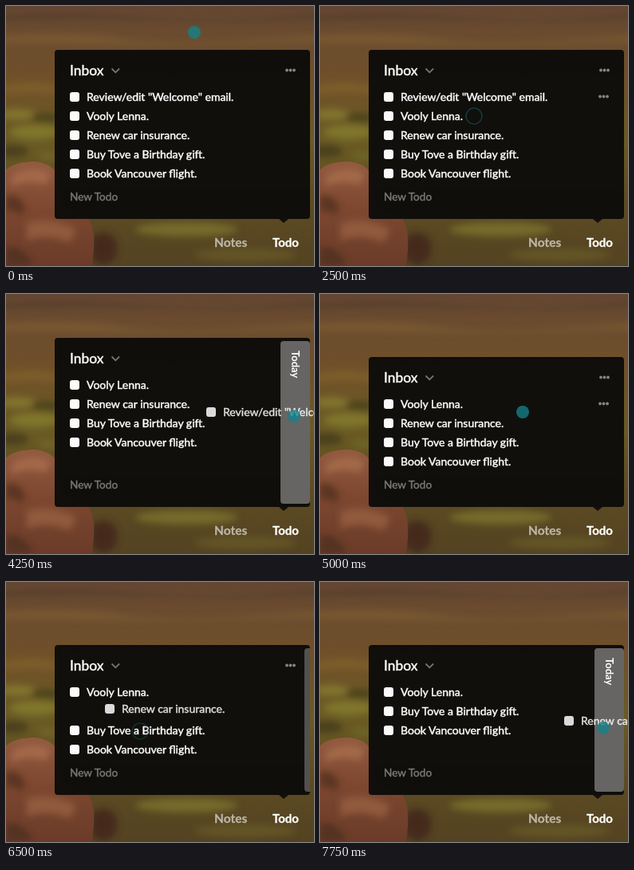
These frames come from a looping animation (386x326 px, 8 s). An HTML page:

```html
<!DOCTYPE html>
<html lang="en">
<head>
<meta charset="utf-8">
<title>Todo drag and drop</title>
<style>
  html, body { margin: 0; width: 100%; height: 100%; overflow: hidden; background: #5d4626; }
  svg { display: block; width: 386px; height: 326px; font-family: Lato, "Open Sans", sans-serif; }

  /* One beat is 250 ms, 3.125% of the loop; every pose holds until the next. */
  .anim { animation: 8s step-end infinite; }

  .row text { font-size: 14px; fill: #fff; stroke: #fff; stroke-width: .45px; }
  .row rect { fill: #fafafa; }
  .dots { fill: #858482; }

  #panel { animation-name: panel; }
  .head { animation-name: head; }
  #second { animation-name: second; }
  .lower { animation-name: lower; }
  #first { animation-name: first; }
  #third { animation-name: third; }
  #rowDots { animation-name: rowDots; }
  #strip { animation-name: strip; }
  #bar { animation-name: bar; }
  #pointer { animation-name: pointer; }
  #disc { animation-name: disc; }
  #ring { animation-name: ring; }

  @keyframes panel {
    0% { y: 55px; height: 212px; }
    62.5% { y: 79px; height: 188px; }
  }
  @keyframes head {
    0% { transform: none; }
    62.5% { transform: translateY(24px); }
  }
  @keyframes second {
    0%, 62.5% { transform: none; }
    40.625% { transform: translateY(-24px); }
  }
  @keyframes lower {
    0%, 62.5% { transform: none; }
    46.875%, 90.625% { transform: translateY(-24px); }
  }
  @keyframes first {
    0% { transform: none; opacity: 1; }
    34.375% { transform: translate(12px, 2px); opacity: .87; }
    37.5% { transform: translate(52px, 7px); }
    40.625% { transform: translate(110px, 14px); }
    43.75% { transform: translate(154px, 19px); }
    46.875% { transform: translate(154px, 22px); }
    50% { transform: translate(154px, 24px); }
    53.125% { transform: translate(171px, 34px); }
    59.375% { opacity: 0; }
  }
  @keyframes third {
    0%, 62.5% { transform: none; opacity: 1; }
    46.875% { transform: translateY(-24px); }
    81.25% { transform: translate(44px, -3px); opacity: .87; }
    84.375% { transform: translate(90px, 0); }
    87.5% { transform: translate(160px, 4px); }
    90.625% { transform: translate(205px, 8px); }
    93.75% { transform: translate(220px, 11px); }
    96.875% { transform: translate(226px, 12px); }
  }
  @keyframes rowDots {
    0%, 46.875%, 65.625%, 81.25% { transform: none; opacity: 0; }
    21.875% { transform: none; opacity: 1; }
    62.5% { transform: translateY(24px); opacity: 1; }
    78.125% { transform: translateY(48px); opacity: 1; }
  }
  @keyframes strip {
    0%, 62.5% { transform: translateX(40px); fill: #525150; }
    34.375% { transform: translateX(33px); }
    37.5%, 81.25% { transform: translateX(30px); fill: #525150; }
    46.875%, 90.625% { transform: translateX(14px); fill: #5b5a59; }
    50%, 93.75% { transform: none; fill: #666564; }
    59.375% { transform: translateX(25px); fill: #525150; }
  }
  @keyframes bar {
    0% { y: 59px; height: 204px; }
    62.5% { y: 83px; height: 180px; }
  }
  @keyframes pointer {
    0% { transform: translate(236px, 33px); }
    6.25% { transform: translate(222px, 42px); }
    9.375% { transform: translate(190px, 62px); }
    12.5% { transform: translate(157px, 83px); }
    15.625% { transform: translate(139px, 94px); }
    18.75% { transform: translate(135px, 96px); }
    21.875% { transform: translate(147px, 104px); }
    25% { transform: translate(175px, 114px); }
    28.125% { transform: translate(190px, 119px); }
    31.25% { transform: translate(193px, 138px); }
    34.375% { transform: translate(202px, 121px); }
    37.5% { transform: translate(242px, 126px); }
    40.625% { transform: translate(300px, 133px); }
    43.75% { transform: translate(343px, 138px); }
    46.875% { transform: translate(343px, 141px); }
    50% { transform: translate(343px, 143px); }
    53.125% { transform: translate(361px, 153px); }
    59.375% { transform: translate(325px, 150px); }
    62.5% { transform: translate(254px, 148px); }
    65.625% { transform: translate(160px, 116px); }
    68.75% { transform: translate(72px, 83px); }
    71.875% { transform: translate(24px, 64px); }
    75% { transform: translate(62px, 112px); }
    78.125% { transform: translate(129px, 171px); }
    81.25% { transform: translate(168px, 187px); }
    84.375% { transform: translate(219px, 171px); }
    87.5% { transform: translate(289px, 175px); }
    90.625% { transform: translate(334px, 179px); }
    93.75% { transform: translate(349px, 182px); }
    96.875% { transform: translate(355px, 183px); }
  }
  @keyframes disc {
    0%, 34.375%, 84.375% { opacity: .78; }
    31.25%, 81.25% { opacity: 0; }
  }
  @keyframes ring {
    0%, 34.375%, 84.375% { opacity: 0; }
    31.25% { opacity: .45; }
    81.25% { opacity: .35; }
  }
</style>
</head>
<body>
<svg viewBox="0 0 386 326">
  <defs>
    <linearGradient id="hill" x2="0" y2="1">
      <stop offset="0" stop-color="#644733"/>
      <stop offset=".1" stop-color="#6a4b2f"/>
      <stop offset=".25" stop-color="#6f4f2a"/>
      <stop offset=".38" stop-color="#6e5427"/>
      <stop offset=".52" stop-color="#6a5a24"/>
      <stop offset=".8" stop-color="#5b4a22"/>
      <stop offset="1" stop-color="#544222"/>
    </linearGradient>
    <linearGradient id="stone" x2="0" y2="1">
      <stop offset="0" stop-color="#925b40"/>
      <stop offset=".45" stop-color="#7d4730"/>
      <stop offset="1" stop-color="#6a3c28"/>
    </linearGradient>
    <filter id="soft" x="-30%" y="-30%" width="160%" height="160%"><feGaussianBlur stdDeviation="4"/></filter>
    <clipPath id="inside"><rect x="61" y="55" width="320" height="212" rx="4"/></clipPath>
    <g id="more"><circle cx="-4.5" r="1.9"/><circle r="1.9"/><circle cx="4.5" r="1.9"/></g>
  </defs>

  <rect width="386" height="326" fill="url(#hill)"/>
  <g filter="url(#soft)">
    <path d="M-10 12Q90 6 180 14T400 8V14Q280 22 190 18T-10 18Z" fill="#573d2b"/>
    <path d="M-10 38Q80 32 150 42T400 36V44Q240 50 140 48T-10 46Z" fill="#7a5931"/>
    <path d="M0 98Q30 92 70 100V112Q30 106 -10 112Z" fill="#7b5c29"/>
    <ellipse cx="14" cy="136" rx="22" ry="7" fill="#81752d"/>
    <ellipse cx="50" cy="140" rx="18" ry="6" fill="#4d451c"/>
    <ellipse cx="36" cy="158" rx="32" ry="9" fill="#807629"/>
    <ellipse cx="8" cy="182" rx="20" ry="8" fill="#4b401b"/>
    <ellipse cx="54" cy="188" rx="14" ry="6" fill="#6e6427"/>
    <ellipse cx="122" cy="304" rx="18" ry="20" fill="#452a1a"/>
    <ellipse cx="226" cy="280" rx="64" ry="9" fill="#766a2b"/>
    <ellipse cx="300" cy="312" rx="64" ry="8" fill="#635425"/>
  </g>
  <path d="M0 206Q8 196 34 195Q58 196 66 214L70 250Q88 262 104 268Q114 282 108 326H0Z" fill="url(#stone)"/>
  <g filter="url(#soft)">
    <path d="M8 212Q34 198 56 210L50 224Q28 216 6 226Z" fill="#a3694a"/>
    <path d="M0 238Q14 234 24 250L20 264Q10 254 0 258Z" fill="#5c3424"/>
    <path d="M26 272Q56 262 88 280L80 296Q50 284 26 294Z" fill="#905a3d"/>
    <path d="M0 302Q24 300 34 326H0Z" fill="#553021"/>
  </g>

  <g font-weight="700" stroke-width=".3">
    <text x="261" y="302" font-size="15.5" fill="#bdb5a7" stroke="#bdb5a7">Notes</text>
    <text x="334" y="302" font-size="15" fill="#fff" stroke="#fff">Todo</text>
  </g>

  <path d="M342 267h12l-6 5z" fill="#12110d"/>
  <rect id="panel" class="anim" x="61" y="55" width="320" height="212" rx="4" fill="#0e0d0b" fill-opacity=".97"/>
  <g class="head anim">
    <text x="80" y="87" font-size="17.5" fill="#fff" stroke="#fff" stroke-width=".4">Inbox</text>
    <path d="M132.5 78.5l4.800 4.800 4.800-4.800" fill="none" stroke="#777571" stroke-width="1.8"/>
    <use href="#more" class="dots" x="356.5" y="80.5"/>
  </g>
  <text x="80" y="244" font-size="13.6" fill="#7b7976" stroke="#7b7976" stroke-width=".4">New Todo</text>

  <g id="second" class="row anim"><rect x="80" y="132" width="12" height="12" rx="3"/><text x="101" y="143">Vooly Lenna.</text></g>
  <g class="row lower anim"><rect x="80" y="180" width="12" height="12" rx="3"/><text x="101" y="191">Buy Tove a Birthday gift.</text></g>
  <g class="row lower anim"><rect x="80" y="204" width="12" height="12" rx="3"/><text x="101" y="215">Book Vancouver flight.</text></g>
  <g id="rowDots" class="anim"><use href="#more" class="dots" x="355.5" y="113.5"/></g>

  <g clip-path="url(#inside)">
    <g id="strip" class="anim">
      <rect id="bar" class="anim" x="344" y="59" width="37" height="204" rx="4"/>
      <g class="head anim">
        <text transform="translate(358 71) rotate(90)" font-size="13" font-weight="700" fill="#fff">Today</text>
      </g>
    </g>
  </g>

  <g id="third" class="row anim"><rect x="80" y="156" width="12" height="12" rx="3"/><text x="101" y="167">Renew car insurance.</text></g>
  <g id="first" class="row anim"><rect x="80" y="108" width="12" height="12" rx="3"/><text x="101" y="119">Review/edit "Welcome" email.</text></g>

  <g id="pointer" class="anim">
    <circle id="disc" class="anim" r="8" fill="#15828a"/>
    <circle id="ring" class="anim" r="10" fill="none" stroke="#14707c" stroke-width="1.5"/>
  </g>
</svg>
</body>
</html>
```
